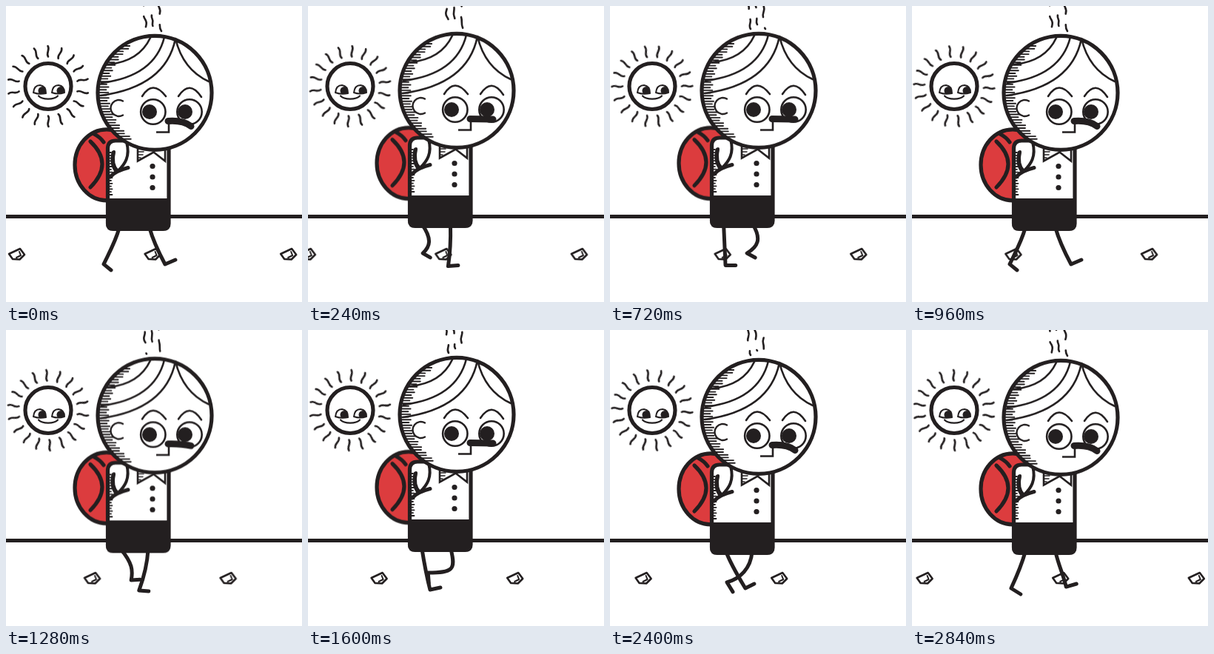
Recreate the animation shown at these times as an HTML page. Size 400 by 400 pixels, loop 2.88 s.

```html
<!DOCTYPE html>
<html lang="en">
<head>
<meta charset="utf-8">
<title>Walking to school</title>
<style>
  html, body { margin: 0; width: 100%; height: 100%; overflow: hidden; background: #fff; }
  svg { display: block; width: 100vw; height: 100vh; }
  .line { fill: none; stroke: #231f20; stroke-width: 2.6; stroke-linecap: round; stroke-linejoin: round; }
  .bold { stroke-width: 5.2; }
  .paper { fill: #fff; }
  .ink { fill: #231f20; stroke: none; }

  #rocks { animation: pass 2880ms steps(72) infinite; }
  #rays { transform-origin: 57px 108.5px; animation: spin 2880ms steps(72) infinite; }
  .steam { stroke-dasharray: 15 15; animation: rise 960ms linear infinite; }
  .upper { animation: nod 480ms linear infinite; }
  #bag { animation: sway 480ms linear infinite; }
  #torso { animation: bob 480ms linear infinite; }
  #lip { stroke-width: 9; animation: lip 480ms linear infinite; }
  .leg { stroke-width: 5; }
  #legA { animation: legA 960ms linear infinite; }
  #legB { animation: legB 960ms linear infinite; }

  @keyframes pass { to { transform: translateX(-183.6px); } }
  @keyframes spin { to { transform: rotate(40deg); } }
  @keyframes rise {
    from { stroke-dashoffset: var(--from); }
    to { stroke-dashoffset: calc(var(--from) - 30px); }
  }
  @keyframes nod {
    0%, 100% { transform: translateY(0); }
    17% { transform: translateY(-2.5px); }
    33%, 50% { transform: translateY(-3px); }
    75% { transform: translateY(-1px); }
    92% { transform: translateY(.9px); }
  }
  @keyframes sway {
    0%, 92%, 100% { transform: translateY(0); }
    17% { transform: translateY(-1.7px); }
    33%, 50% { transform: translateY(-2.4px); }
    75% { transform: translateY(-1px); }
  }
  @keyframes bob {
    0%, 92%, 100% { transform: translateY(0); }
    17% { transform: translateY(-1.6px); }
    33%, 50% { transform: translateY(-4px); }
    75% { transform: translateY(-2px); }
  }
  @keyframes lip {
    0%, 92%, 100% { d: path("M219 155.5 Q239 154 250 162.5"); }
    17% { d: path("M219 155.5 Q237 154 250.5 159.5"); }
    33%, 55% { d: path("M219 155.5 Q235 155.5 250 156"); }
  }
  @keyframes legA {
    0%, 100% { d: path("M153 300 C148 318 139 334 132 349 L142 357"); }
    8.33% { d: path("M153 298 C157 318 154 324 134 343 L143 354"); }
    16.7% { d: path("M154 296 C159 322 156 328 136 330 L140 343"); }
    25% { d: path("M154 295 C168 315 165 325 155 334 L165 340"); }
    37.5% { d: path("M156 297 C172 315 175 325 176 340 L189 336"); }
    50% { d: path("M157 300 C164 318 174 334 183 349 L195 343"); }
    66.7% { d: path("M154 296 C157 315 161 335 165 351 L179 348"); }
    95.8% { d: path("M153 300 C148 318 141 334 134 349 L147 357"); }
  }
  @keyframes legB {
    0%, 100% { d: path("M194 300 C199 318 207 334 215 349 L229 343"); }
    8.33% { d: path("M193 298 C197 318 204 335 209 352 L222 347"); }
    16.7% { d: path("M193 296 C195 315 198 335 199 351 L213 348"); }
    33.3% { d: path("M192 297 C191 315 186 335 180 352 L193 353"); }
    50% { d: path("M192 300 C190 322 176 336 158 341 L166 354"); }
    66.7% { d: path("M193 296 C200 324 196 328 162 328 L163 342"); }
    75% { d: path("M193 295 C205 315 200 325 185 334 L196 340"); }
    95.8% { d: path("M194 300 C198 318 205 332 208 347 L222 343"); }
  }
</style>
</head>
<body>
<svg viewBox="0 0 400 400" preserveAspectRatio="none">
  <defs>
    <clipPath id="eyes"><path d="M37 117 Q38 107 46 107 Q54 108 54 118 Q45 120 37 117Z M62 117 Q63 107 71 107 Q79 108 79 117 Q70 120 62 117Z"/></clipPath>
    <g id="rock" class="line">
      <path class="paper" d="M4 335 L19 328 L25 336 L18.500 342.500 L9 342 Z"/>
      <path d="M18 332 L20 337 L14 340" stroke-width="2"/>
    </g>
  </defs>

  <g class="line">
    <path d="M-5 284.500 H405" stroke-width="5"/>
    <g id="rocks">
      <use href="#rock"/>
      <use href="#rock" x="183.6"/>
      <use href="#rock" x="367.2"/>
      <use href="#rock" x="550.8"/>
    </g>

    <g id="rays"></g>
    <circle class="bold" cx="57" cy="108.5" r="31"/>
    <path d="M37 117 Q38 107 46 107 Q54 108 54 118 Q45 120 37 117Z M62 117 Q63 107 71 107 Q79 108 79 117 Q70 120 62 117Z" stroke-width="2"/>
    <g class="ink" clip-path="url(#eyes)">
      <circle cx="49" cy="114.500" r="5.500"/>
      <circle cx="74" cy="114.500" r="5.500"/>
    </g>
    <path d="M44 121.500 C49 127 65 127 70 121.500" stroke-width="2.200"/>

    <g class="upper">
      <path class="steam" style="--from:-6px" d="M190 34 C186 28 193 25 188 18 S190 9 187 2 S188 -8 187 -14"/>
      <path class="steam" style="--from:-1px" d="M199 28 C196 24 200 22 197.500 17 S200 8 196 1 S197 -8 195 -14"/>
      <path class="steam" style="--from:6px" d="M210 34 C206 28 209 24 207 18 S211 9 207 2 S207 -8 206 -14"/>
    </g>

    <path id="legB" class="leg" d="M194 300 L215 349 L229 343"/>
    <path id="legA" class="leg" d="M153 300 L132 349 L142 357"/>

    <g id="bag" class="bold">
      <ellipse cx="136" cy="214.800" rx="43" ry="48" fill="#dc3c3e"/>
      <path d="M114 183 Q146 213 114 245 M119 173 Q127 177 132 184"/>
    </g>

    <g id="torso">
      <path class="paper bold" d="M137.500 294 V192 Q138 182 148 182 H220 V294 Q220 301 213 301 H145 Q137.500 301 137.500 294Z"/>
      <path class="ink" d="M136 260 H222 V294 Q222 304 212 304 H145 Q135 304 135 294Z"/>
      <path id="sideHatch" stroke-width="1.800"/>
      <path class="paper" d="M178 192 V209.500 L199.500 197.500 L215 209.500 V192" stroke-linejoin="miter"/>
      <path d="M179 197 H186 M179 201 H185 M179 205 H182" stroke-width="1.500"/>
      <g class="ink">
        <circle cx="198" cy="216.500" r="3.600"/>
        <circle cx="198" cy="231" r="3.600"/>
        <circle cx="198" cy="245.500" r="3.600"/>
      </g>
      <path class="paper" d="M146 197 C143 211 147 219 151 223 C161 214 168 203 163 184" stroke-width="4"/>
      <path d="M145 198 C142 212 145 219 150 224 M141 231 Q147 223 165 218.500" stroke-width="5"/>
    </g>

    <g class="upper">
      <circle class="paper bold" cx="201" cy="117.300" r="77"/>
      <path id="headHatch" stroke-width="1.900"/>
      <path d="M195 43 Q180 75 138 79 M214 42 Q201 95 129 104 M229 44 Q216 109 128 121 M229 44 Q239 86 274 102"/>
      <path class="paper" d="M158 128.500 A11 11 0 1 0 158 147.500" stroke-width="2.400"/>
      <path d="M184 122 Q198 99 216 122 M233 122 Q248 99 264 123"/>
      <circle cx="198.800" cy="143" r="16.700"/>
      <circle cx="248" cy="143" r="16.700"/>
      <g class="ink">
        <circle cx="194" cy="143" r="10"/>
        <circle cx="242" cy="143" r="10"/>
      </g>
      <path class="paper" d="M220 156 V170.500 H203" stroke-linecap="butt" stroke-linejoin="miter"/>
      <path id="lip" d="M219 155.500 Q239 154 250 162.500"/>
    </g>
  </g>
</svg>
<script>
  const byId = id => document.getElementById(id);

  const rayCount = 18;
  let rays = "";
  for (let i = 0; i < rayCount; i++) {
    const angle = 360 / rayCount * (i + 0.5);
    rays += `<path d="M97 108.5 c5 -3.5 9 3 14.500 -.5" transform="rotate(${angle} 57 108.5)"/>`;
  }
  byId("rays").innerHTML = rays;

  // Horizontal strokes that shade the left edges
  function hatch(id, top, bottom, gap, edge, length) {
    let d = "";
    for (let y = top, i = 0; y <= bottom; y += gap, i++) d += `M${edge(y)} ${y}h${length(i)}`;
    byId(id).setAttribute("d", d);
  }
  hatch("headHatch", 54, 182, 3.7, y => 201 - Math.sqrt(77 ** 2 - (y - 117.3) ** 2), i => 10 + i % 2 * 3 + i * 0.08);
  hatch("sideHatch", 198, 256, 3.8, () => 138, i => 4 + i % 2 * 1.5);
</script>
</body>
</html>
```
